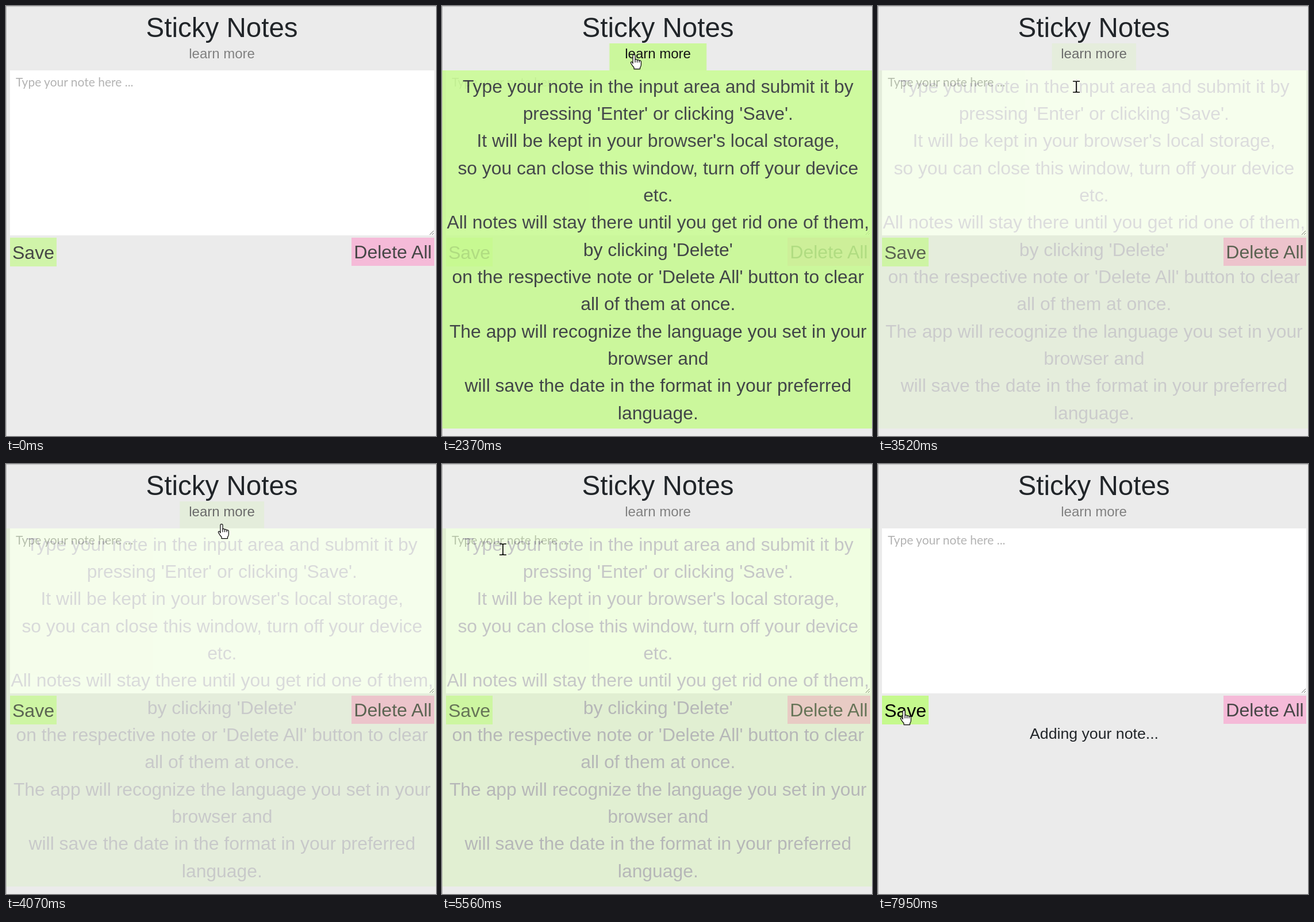
These frames come from a looping animation (748x748 px, 8000 ms). An HTML page:

```html
<!DOCTYPE html>
<html lang="en">
<head>
<meta charset="utf-8">
<title>Sticky Notes</title>
<style>
html, body { margin: 0; width: 100%; height: 100%; overflow: hidden; background: #ebebeb; }
.stage { position: relative; width: 748px; height: 748px; overflow: hidden; }
svg { position: absolute; left: 0; top: 0; }
text { font-family: "Liberation Sans", Arial, sans-serif; text-anchor: middle; }

/* One loop is 8 s, so 1% is 80 ms. */
.tab, .link, .help, .save, .mouse { animation: 8s linear infinite; }
.hint, .typed, .typed b, .caret, .beam, .hand, .status { animation: 8s step-end infinite; }

.tab { transform-origin: 376px 0; animation-name: tab; }
@keyframes tab {
  0%, 26.25% { opacity: 0; transform: scaleX(.81); animation-timing-function: ease; }
  32.5% { opacity: 1; transform: none; }
  40.6% { opacity: 1; transform: none; animation-timing-function: ease; }
  46.9% { opacity: 0; transform: scaleX(.81); }
  50% { opacity: 0; transform: scaleX(.81); animation-timing-function: ease; }
  56.25% { opacity: 1; transform: none; }
  63.75% { opacity: 1; transform: none; animation-timing-function: ease; }
  68.75%, 100% { opacity: 0; transform: scaleX(.81); }
}
.link { animation-name: link; }
@keyframes link {
  0%, 26.25% { fill: #808080; animation-timing-function: ease; }
  32.5% { fill: #000; }
  40.6% { fill: #000; animation-timing-function: ease; }
  46.9% { fill: #808080; }
  50% { fill: #808080; animation-timing-function: ease; }
  56.25% { fill: #000; }
  63.75% { fill: #000; animation-timing-function: ease; }
  68.75%, 100% { fill: #808080; }
}
.help { animation-name: help; }
@keyframes help {
  0%, 26.25% { opacity: 0; animation-timing-function: ease; }
  32.5% { opacity: 1; }
  40.6% { opacity: 1; animation-timing-function: ease; }
  46.9% { opacity: 0; }
  50% { opacity: 0; animation-timing-function: ease; }
  56.25% { opacity: 1; }
  66.75% { opacity: 1; animation-timing-function: ease; }
  73%, 100% { opacity: 0; }
}
.save { animation-name: save; }
@keyframes save {
  0%, 92.9% { opacity: .7; animation-timing-function: ease; }
  97%, 100% { opacity: 1; }
}
.status { animation-name: status; }
@keyframes status { 0% { opacity: 0; } 96.375%, 100% { opacity: 1; } }

/* Note field */
.hint, .note { position: absolute; left: 17px; top: 112px; height: 39px; white-space: pre;
  font: 21px/39px Lato, sans-serif; }
.hint { color: #b3b3b3; animation-name: hint; }
@keyframes hint { 0% { opacity: 1; } 84% { opacity: 0; } 96.375%, 100% { opacity: 1; } }
.note { color: #212529; }
.typed { animation-name: typed; }
@keyframes typed { 0% { opacity: 0; } 84% { opacity: 1; } 96.375%, 100% { opacity: 0; } }
.typed b { font-weight: 400; animation-name: letter; animation-fill-mode: backwards; }
.typed b:nth-child(2) { animation-delay: .23s; }
.typed b:nth-child(3) { animation-delay: .31s; }
.typed b:nth-child(4) { animation-delay: .39s; }
.typed b:nth-child(5) { animation-delay: .47s; }
@keyframes letter { 0% { font-size: 0; } 84%, 100% { font-size: 21px; } }
.caret { display: inline-block; width: 1px; height: 39px; vertical-align: top;
  background: #000; animation-name: caret; }
@keyframes caret {
  0% { opacity: 0; } 74.25% { opacity: 1; } 81.125% { opacity: 0; }
  84% { opacity: 1; } 96.375%, 100% { opacity: 0; }
}

/* Pointer */
.mouse { animation-name: mouse; }
@keyframes mouse {
  0%, 9.375% { transform: translate(127px, 47px); }
  13.25%, 16.1% { transform: translate(362px, 56px); }
  18.75% { transform: translate(260px, 38px); }
  20.5% { transform: translate(216px, 24px); }
  23.5% { transform: translate(385px, 40px); }
  25.6% { transform: translate(345px, 66px); }
  26.7%, 40% { transform: translate(334px, 84px); }
  40.125% { transform: translate(336px, 97px); }
  42.5%, 49% { transform: translate(345px, 140px); }
  50.875% { transform: translate(375px, 104px); }
  56.75%, 63.5% { transform: translate(325px, 88px); }
  63.625% { transform: translate(323px, 84px); }
  69.5% { transform: translate(106px, 148px); }
  73.4%, 84% { transform: translate(80px, 134px); }
  90.6% { transform: translate(75px, 200px); }
  93.5%, 100% { transform: translate(45px, 428px); }
}
.beam { animation-name: beam; }
@keyframes beam {
  0% { opacity: 0; } 9.375% { opacity: 1; } 26.25% { opacity: 0; }
  40.6% { opacity: 1; } 50% { opacity: 0; } 64.5% { opacity: 1; }
  84% { opacity: 0; } 90.6% { opacity: 1; } 92.9%, 100% { opacity: 0; }
}
.hand { animation-name: hand; }
@keyframes hand {
  0% { opacity: 0; } 26.25% { opacity: 1; } 40.6% { opacity: 0; }
  50% { opacity: 1; } 64.5% { opacity: 0; } 92.9%, 100% { opacity: 1; }
}
</style>
</head>
<body>
<div class="stage">
  <svg width="748" height="748">
    <path d="M0 .75H748M.5 0V748" stroke="#b5b5b5"/>
    <text x="375.6" y="53.5" font-size="47.5" fill="#212529">Sticky Notes</text>
    <rect class="tab" x="288.6" y="65" width="174.4" height="47" fill="#c5f98d"/>
    <text class="link" x="375.6" y="91" font-size="24">learn more</text>
    <rect x="7" y="112" width="738" height="287" fill="#fff"/>
    <path d="M737 398l7-7M741 398l3-3" stroke="#666"/>
    <g class="save">
      <rect x="7" y="403" width="81" height="50" fill="#c5f98d"/>
      <text x="47.5" y="440" font-size="32.1">Save</text>
    </g>
    <g opacity=".7">
      <rect x="601" y="403" width="144" height="49" fill="#f9a6d1"/>
      <text x="673" y="439" font-size="32.1">Delete All</text>
    </g>
    <text class="status" x="376" y="478" font-size="26.7" fill="#212529">Adding your note...</text>
  </svg>

  <div class="hint">Type your note here ...</div>
  <div class="note"><span class="typed"><b>H</b><b>e</b><b>l</b><b>l</b><b>o</b></span><i class="caret"></i></div>

  <svg width="748" height="748">
    <g class="help">
      <rect x=".6" y="112" width="748" height="623" fill="#c5f98d"/>
      <g font-size="31.85" fill="#212529" transform="translate(375.8)">
        <text y="150.6">Type your note in the input area and submit it by</text>
        <text y="198">pressing 'Enter' or clicking 'Save'.</text>
        <text y="245.3">It will be kept in your browser's local storage,</text>
        <text y="292.7">so you can close this window, turn off your device</text>
        <text y="340">etc.</text>
        <text y="387.4">All notes will stay there until you get rid one of them,</text>
        <text y="434.7">by clicking 'Delete'</text>
        <text y="482">on the respective note or 'Delete All' button to clear</text>
        <text y="529.4">all of them at once.</text>
        <text y="576.7">The app will recognize the language you set in your</text>
        <text y="624.1">browser and</text>
        <text y="671.4">will save the date in the format in your preferred</text>
        <text y="718.8">language.</text>
      </g>
    </g>
    <g class="mouse">
      <path class="beam" d="M-6-9h4q2 0 2 2q0-2 2-2h4M0-7V8M-6 10h4q2 0 2-2q0 2 2 2h4" fill="none" stroke="#000" stroke-width="1.7"/>
      <g class="hand" fill="#fff" stroke="#000" stroke-width="1.2" stroke-linejoin="round" stroke-linecap="round">
        <path d="M-2 16V2Q-2 .6 0 .6Q2 .6 2 2V9Q4 7.8 5.5 10Q7.8 9 9 11Q12.4 10.4 12.4 13.5V18Q12.4 21 10.5 23V25.6H0V23Q-3 20-5.4 15.5Q-6 13-4 13Q-3 13-2 16Z"/>
        <path d="M2 9v5M5.5 10v4M9 11v3" fill="none"/>
      </g>
    </g>
  </svg>
</div>
</body>
</html>
```
